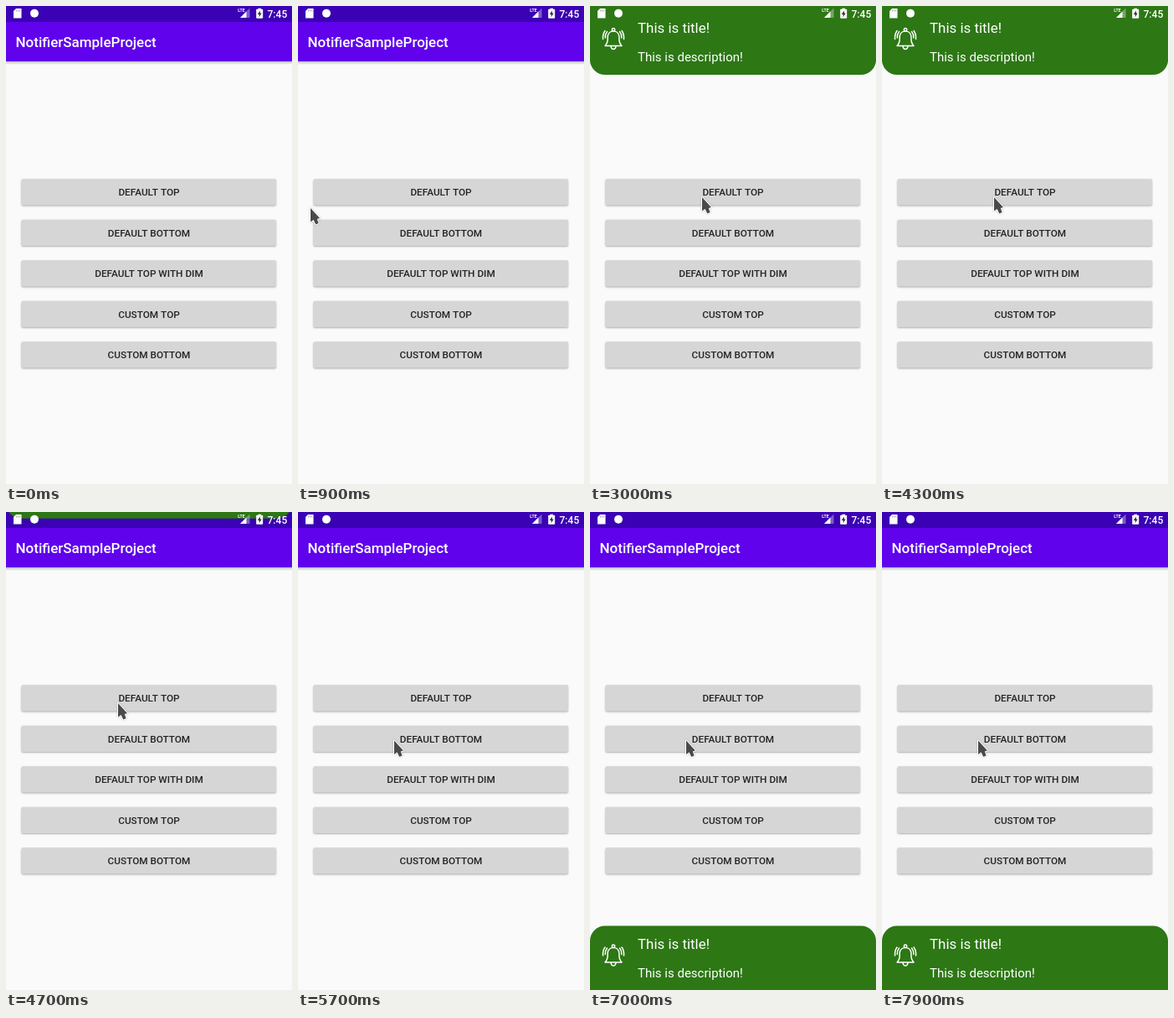
Recreate the animation shown at these times as an HTML page with a canvas. Size 342 px wide and 570 px high, loop 8 s.

```html
<!DOCTYPE html>
<html lang="en">
<head>
<meta charset="utf-8">
<title>Notifier sample</title>
<style>
  html, body { margin: 0; width: 100%; height: 100%; overflow: hidden; background: #fafafa; }
  canvas { display: block; width: 342px; height: 570px; }
</style>
</head>
<body>
<canvas id="stage"></canvas>
<script>
const W = 342, H = 570, LOOP = 8000, STEP = 100;
const FONT = 'Roboto, "Open Sans", sans-serif';
const GREEN = '#2d7715';
const LABELS = ['DEFAULT TOP', 'DEFAULT BOTTOM', 'DEFAULT TOP WITH DIM', 'CUSTOM TOP', 'CUSTOM BOTTOM'];
const BUTTON = { x: 18.5, y: 206.2, w: 304.5, h: 31.3, pitch: 48.5 };

const canvas = document.getElementById('stage');
const ctx = canvas.getContext('2d');
const dpr = window.devicePixelRatio || 1;
canvas.width = W * dpr;
canvas.height = H * dpr;

const clamp = v => Math.max(0, Math.min(1, v));
const lerp = (a, b, p) => a + (b - a) * p;
const span = (t, from, to) => clamp((t - from) / (to - from));
const ease = p => (1 - Math.cos(Math.PI * p)) / 2;

function text(str, x, y, size, weight = 400, color = '#fff', align = 'left') {
  ctx.font = `${weight} ${size}px ${FONT}`;
  ctx.textAlign = align;
  ctx.fillStyle = color;
  ctx.fillText(str, x, y);
}

function rect(x, y, w, h, color) {
  ctx.fillStyle = color;
  ctx.fillRect(x, y, w, h);
}

function poly(points, color) {
  ctx.beginPath();
  points.forEach(([x, y]) => ctx.lineTo(x, y));
  ctx.closePath();
  ctx.fillStyle = color;
  ctx.fill();
}

function rounded(x, y, w, h, r) {
  ctx.beginPath();
  ctx.roundRect(x, y, w, h, r);
}

function appBar() {
  const shade = ctx.createLinearGradient(0, 65, 0, 70);
  shade.addColorStop(0, 'rgba(0,0,0,.3)');
  shade.addColorStop(1, 'rgba(0,0,0,0)');
  rect(0, 65, W, 5, shade);
  rect(0, 0, W, 66, '#6002ec');
  rect(0, 0, W, 19, '#3a02b4');
  text('NotifierSampleProject', 11.5, 49, 17, 500);
}

function button(label, i) {
  const { x, w, h } = BUTTON, y = BUTTON.y + i * BUTTON.pitch;
  ctx.save();
  ctx.shadowColor = 'rgba(0,0,0,.3)';
  ctx.shadowBlur = 2 * dpr;
  ctx.shadowOffsetY = dpr;
  rounded(x, y, w, h, 1.7);
  ctx.fillStyle = '#d6d6d6';
  ctx.fill();
  ctx.restore();
  text(label, W / 2, y + 20, 11.8, 500, '#242424', 'center');
}

// Touch feedback spreading inside a button, then fading
function ripple(t, start, i, cx) {
  const grow = span(t, start, start + 350), fade = 1 - span(t, start + 250, start + 700);
  if (grow <= 0 || fade <= 0) return;
  const { x, w, h } = BUTTON, y = BUTTON.y + i * BUTTON.pitch;
  ctx.save();
  rounded(x, y, w, h, 1.7);
  ctx.clip();
  ctx.fillStyle = `rgba(0,0,0,${0.02 * fade})`;
  ctx.fillRect(x, y, w, h);
  ctx.beginPath();
  ctx.arc(lerp(cx, x + w / 2, grow), y + h / 2, lerp(8, 155, grow * grow), 0, 7);
  ctx.fillStyle = `rgba(0,0,0,${0.035 * fade})`;
  ctx.fill();
  ctx.restore();
}

function bell(cx, cy) {
  ctx.save();
  ctx.translate(cx, cy);
  ctx.strokeStyle = '#fff';
  ctx.lineWidth = 1.5;
  ctx.lineCap = ctx.lineJoin = 'round';
  ctx.beginPath();
  ctx.arc(0, -10.8, 1.7, 0, 7);
  ctx.moveTo(-10, 8.5);
  ctx.bezierCurveTo(-5.5, 4, -7.3, 1, -6.8, -3);
  ctx.bezierCurveTo(-6, -11, 6, -11, 6.8, -3);
  ctx.bezierCurveTo(7.3, 1, 5.5, 4, 10, 8.5);
  ctx.closePath();
  ctx.moveTo(-3, 9);
  ctx.bezierCurveTo(-2.6, 13.6, 2.6, 13.6, 3, 9);
  for (const s of [-1, 1]) {
    ctx.moveTo(s * 7.5, -8.5);
    ctx.quadraticCurveTo(s * 10, -5.5, s * 9.8, -1);
    ctx.moveTo(s * 10, -9.5);
    ctx.quadraticCurveTo(s * 13, -5.5, s * 12.5, 0.5);
  }
  ctx.stroke();
  ctx.restore();
}

// dy shifts the content, whose rows sit the same in both banners
function banner(top, height, radii, dy) {
  rounded(0, top, W, height, radii);
  ctx.fillStyle = GREEN;
  ctx.fill();
  bell(28, 39 + dy);
  text('This is title!', 57, 31.7 + dy, 16.9);
  text('This is description!', 57, 65.5 + dy, 15);
}

function statusIcons() {
  poly([[12, 3], [18.5, 3], [18.5, 14.5], [9, 14.5], [9, 6]], '#fff');
  for (let i = 0; i < 3; i++) rect(12 + i * 2, 4.3, 1, 2.3, '#77777799');
  ctx.beginPath();
  ctx.arc(34, 8.7, 5, 0, 7);
  ctx.fillStyle = '#fff';
  ctx.fill();

  poly([[291.5, 2.5], [291.5, 14], [280, 14]], 'rgba(255,255,255,.35)');
  poly([[287.5, 6.5], [287.5, 14], [280, 14]], '#fff');
  text('LTE', 277.3, 7.3, 5.2, 700);

  rect(301.5, 2.7, 3.5, 2, '#fff');
  rounded(299.2, 3.8, 8, 11, 0.8);
  ctx.fillStyle = '#fff';
  ctx.fill();
  poly([[303.9, 5.5], [300.8, 10], [302.7, 10], [302.7, 13.2], [305.7, 8.6], [303.9, 8.6]], '#333');
  text('7:45', 312.5, 13.5, 12.1, 500);
}

function cursorAt(t) {
  if (t < 800) return null;
  if (t < 900) return [4, 244];
  const a = ease(span(t, 900, 1600)), b = ease(span(t, 5000, 5400));
  return [lerp(lerp(15, 134, a), 115, b), lerp(lerp(241, 228, a), 272.5, b)];
}

function cursor([x, y]) {
  ctx.save();
  ctx.translate(x, y);
  ctx.shadowColor = 'rgba(0,0,0,.25)';
  ctx.shadowBlur = 2 * dpr;
  ctx.beginPath();
  [[0, 0], [0, 16.5], [3.6, 14], [6.3, 19.5], [9.6, 18], [7.8, 13], [11, 12]]
    .forEach(p => ctx.lineTo(...p));
  ctx.closePath();
  ctx.lineJoin = 'round';
  ctx.lineWidth = 2;
  ctx.strokeStyle = '#fff';
  ctx.stroke();
  ctx.restore();
  ctx.save();
  ctx.translate(x, y);
  ctx.fillStyle = '#4a4a4a';
  ctx.fill();
  ctx.restore();
}

function draw(t) {
  ctx.setTransform(dpr, 0, 0, dpr, 0, 0);
  rect(0, 0, W, H, '#fafafa');
  appBar();
  LABELS.forEach(button);
  ripple(t, 2130, 0, 134);
  ripple(t, 5930, 1, 115);

  const top = ease(span(t, 2170, 2670)) - ease(span(t, 4300, 4800));
  if (top > 0) {
    const dy = -82 * (1 - top);
    banner(dy, 82, [0, 0, 18, 18], dy);
  }
  const bottom = ease(span(t, 5970, 6470));
  if (bottom > 0) {
    const y = H - 76.5 * bottom;
    banner(y, 80, [18, 18, 0, 0], y - 4);
  }

  statusIcons();
  const pos = cursorAt(t);
  if (pos) cursor(pos);
}

const begin = performance.now();
function tick() {
  const t = (performance.now() - begin) % LOOP;
  draw(Math.floor(t / STEP) * STEP);
  requestAnimationFrame(tick);
}
tick();
</script>
</body>
</html>
```
